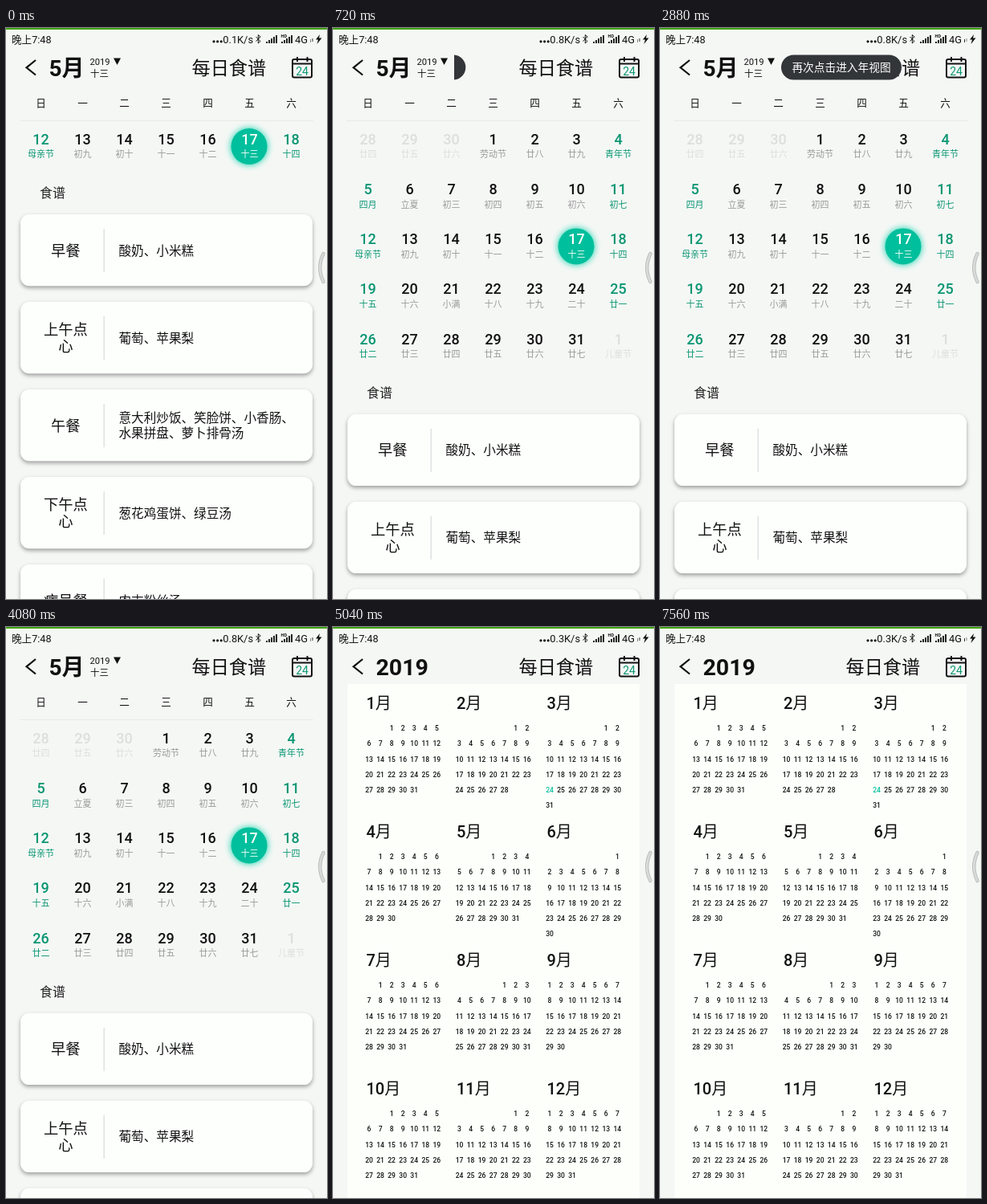
Animation, 400 px wide and 711 px high, one loop 8 s. Source, as an HTML page with a canvas:

```html
<!DOCTYPE html>
<html lang="zh">
<head>
<meta charset="utf-8">
<title>每日食谱</title>
<style>
  html, body { margin: 0; width: 100%; height: 100%; overflow: hidden; background: #f5f7f5; }
  canvas { display: block; width: 400px; height: 711px; }
</style>
</head>
<body>
<canvas id="stage" width="400" height="711"></canvas>
<script>
const ctx = document.getElementById('stage').getContext('2d');
const LOOP = 8000, TICK = 120;
const BG = '#f5f7f5', INK = '#111', GREEN = '#0a9672', TEAL = '#00bf9c';
const FONT = 'Roboto, "Noto Sans CJK SC", "Noto Sans CJK", "Noto Sans SC", sans-serif';
const ROW = 62.2, GRID_TOP = 116, GRID_MID = 271.7;

const WEEK = [...'日一二三四五六'];
const LABELS = ('廿四 廿五 廿六 劳动节 廿八 廿九 青年节 四月 立夏 初三 初四 初五 初六 初七 ' +
  '母亲节 初九 初十 十一 十二 十三 十四 十五 十六 小满 十八 十九 二十 廿一 ' +
  '廿二 廿三 廿四 廿五 廿六 廿七 儿童节').split(' ');
const MEALS = [
  [['早餐'], ['酸奶、小米糕']],
  [['上午点', '心'], ['葡萄、苹果梨']],
  [['午餐'], ['意大利炒饭、笑脸饼、小香肠、', '水果拼盘、萝卜排骨汤']],
  [['下午点', '心'], ['葱花鸡蛋饼、绿豆汤']],
  [['病号餐'], ['肉末粉丝汤']],
];

const progress = (t, start, length) => Math.min(1, Math.max(0, (t - start) / length));
const ease = p => (1 - Math.cos(Math.PI * p)) / 2;
const columnX = i => 43.5 + 52 * i;

// Text is placed by its vertical middle.
function text(str, x, middle, size, { color = INK, weight = 400, align = 'left' } = {}) {
  ctx.font = `${weight} ${size}px ${FONT}`;
  ctx.fillStyle = color;
  ctx.textAlign = align;
  ctx.fillText(str, x, middle + size * 0.365);
}

function rect(x, y, w, h, color) {
  ctx.fillStyle = color;
  ctx.fillRect(x, y, w, h);
}

function line(points, width, color = INK) {
  ctx.beginPath();
  points.forEach(([x, y]) => ctx.lineTo(x, y));
  ctx.lineWidth = width;
  ctx.strokeStyle = color;
  ctx.stroke();
}

function polygon(points, color = INK) {
  ctx.beginPath();
  points.forEach(([x, y]) => ctx.lineTo(x, y));
  ctx.fillStyle = color;
  ctx.fill();
}

function rounded(x, y, w, h, r) {
  ctx.beginPath();
  ctx.roundRect(x, y, w, h, r);
}

function clipped(x, y, w, h, draw) {
  ctx.save();
  ctx.beginPath();
  ctx.rect(x, y, w, h);
  ctx.clip();
  draw();
  ctx.restore();
}

function shadow(color, blur, dy = 0) {
  ctx.shadowColor = color;
  ctx.shadowBlur = blur;
  ctx.shadowOffsetY = dy;
}

function signal(x) {
  for (let i = 0; i < 5; i++) rect(x + i * 3, 17 - i * 2, 2, 2 + i * 2, '#222');
}

function statusBar(t) {
  rect(0, 0, 400, 2, '#3fa30f');
  text('晚上7:48', 7, 14, 12.6);
  const speed = t < 120 ? '0.1' : t < 4680 ? '0.8' : '0.3';
  text(speed + 'K/s', 308, 14, 12.8, { align: 'right' });
  for (let i = 0; i < 3; i++) {
    ctx.beginPath();
    ctx.arc(259 + i * 4.6, 16.8, 1.6, 0, 7);
    ctx.fillStyle = INK;
    ctx.fill();
  }
  line([[311.5, 11], [317, 16.5], [314.3, 19], [314.3, 8.5], [317, 11], [311.5, 16.5]], 1);
  signal(324);
  signal(343);
  rect(342, 7, 9, 6, BG);
  text('HD', 342.5, 9.7, 5.5, { weight: 700 });
  text('4G', 360, 14, 12.8);
  const busy = t >= 2880 && t < 3960 || t >= 7560;
  line([[379.5, 14], [379.5, 18]], 1, busy ? '#333' : '#888');
  line([[382, 13], [382, 17]], 1, busy ? '#888' : '#333');
  polygon([[391, 8], [386, 14.5], [389, 14.5], [387.5, 20], [393.5, 12.5], [390, 12.5]]);
}

function header(isYear) {
  line([[37, 40], [25.5, 49.3], [37, 58.5]], 2.2);
  if (isYear) {
    text('2019', 53.5, 50, 28.5, { weight: 700 });
  } else {
    text('5月', 53.5, 50, 28, { weight: 700 });
    text('2019', 104.5, 42, 11.2);
    text('十三', 105, 57.3, 11.4);
    polygon([[134, 37.5], [143, 37.5], [138.5, 46]]);
  }
  text('每日食谱', 231.5, 49.7, 23.2);
  rounded(357, 39, 24, 22.5, 2);
  ctx.lineWidth = 2;
  ctx.strokeStyle = INK;
  ctx.stroke();
  line([[357, 44.5], [381, 44.5]], 2);
  for (const x of [363, 375.5]) line([[x, 36], [x, 42]], 2);
  text('24', 369, 53.5, 14, { color: GREEN, align: 'center' });
}

function weekBar(shift) {
  rect(0, 71, 400, 45, BG);
  clipped(0, 71, 400, 44, () =>
    WEEK.forEach((d, i) => text(d, columnX(i), 93.5 - shift, 12.6, { align: 'center' })));
  rect(17, 115, 366, 1, '#e8ebe9');
}

function monthGrid(shift, scale) {
  ctx.save();
  ctx.translate(199.5, GRID_MID + shift);
  ctx.scale(scale, scale);
  ctx.translate(-199.5, -GRID_MID);
  LABELS.forEach((label, i) => {
    const column = i % 7, x = columnX(column), y = GRID_TOP + ROW * Math.floor(i / 7);
    const selected = i === 19, outside = i < 3 || i > 33;
    const weekend = column % 6 === 0;
    if (selected) {
      ctx.save();
      shadow('#00d0a8', 9 * scale);
      ctx.beginPath();
      ctx.arc(x - 0.5, y + 31.5, 22.5, 0, 7);
      ctx.fillStyle = TEAL;
      ctx.fill();
      ctx.restore();
    }
    const pick = normal => selected ? '#fff' : outside ? '#dcdfdd' : weekend ? GREEN : normal;
    const day = i < 3 ? 28 + i : (i - 3) % 31 + 1;
    text(day, x, y + 22.3, 18, { color: pick(INK), weight: 500, align: 'center' });
    text(label, x, y + 41.3, 11, { color: pick('#999'), align: 'center' });
  });
  ctx.restore();
}

function mealList(shift) {
  ctx.save();
  ctx.translate(0, shift);
  rect(0, 178.5, 400, 711, BG);
  text('食谱', 42, 205, 16, { color: '#222' });
  MEALS.forEach(([name, dishes], i) => {
    const top = 232 + 109 * i, middle = top + 45;
    ctx.save();
    shadow('rgba(0,0,0,.36)', 5, 2.5);
    rounded(18, top, 364, 89.3, 11);
    ctx.fillStyle = '#fdfffd';
    ctx.fill();
    ctx.restore();
    rect(121.5, top + 18, 1.3, 54, '#dadddb');
    const column = (lines, x, size, pitch, align) => lines.forEach((str, n) =>
      text(str, x, middle + (n - (lines.length - 1) / 2) * pitch, size, { align }));
    column(name, 74.3, 18.3, 20.8, 'center');
    column(dishes, 140.5, 15.6, 19.6, 'left');
  });
  ctx.restore();
}

function yearView() {
  rect(18, 71, 364, 640, '#fcfffa');
  for (let m = 0; m < 12; m++) {
    const x = 42 + 112.5 * (m % 3), y = 95 + 160 * Math.floor(m / 3);
    text(`${m + 1}月`, x - 0.5, y, 20, { weight: 500 });
    const first = new Date(2019, m, 1).getDay();
    const days = new Date(2019, m + 1, 0).getDate();
    for (let d = 1; d <= days; d++) {
      const cell = first + d - 1, today = m === 2 && d === 24;
      text(d, x + 3 + 14.05 * (cell % 7), y + 31 + 19.2 * Math.floor(cell / 7), 8.5,
        { weight: 500, align: 'center', color: today ? TEAL : INK });
    }
  }
}

function toast(shown) {
  if (!shown) return;
  clipped(151, 30, 151, 40, () => {
    ctx.translate(-150 * (1 - shown), 0);
    rounded(151, 33.5, 150, 31, 15.5);
    ctx.fillStyle = '#333638';
    ctx.fill();
    text('再次点击进入年视图', 226, 49.3, 13.7, { color: '#fff', align: 'center' });
  });
}

function touch(x, y) {
  ctx.beginPath();
  ctx.arc(x, y, 12.5, 0, 7);
  ctx.fillStyle = 'rgba(235,235,250,.15)';
  ctx.fill();
  ctx.lineWidth = 1.2;
  ctx.strokeStyle = 'rgba(205,205,228,.5)';
  ctx.stroke();
}

function edgeHandle() {
  for (const [width, color] of [[4.5, '#bcbebd'], [2.5, '#d9dbda']]) {
    ctx.beginPath();
    ctx.moveTo(395.5, 281);
    ctx.quadraticCurveTo(387, 298.5, 395.5, 316);
    ctx.lineCap = 'round';
    ctx.lineWidth = width;
    ctx.strokeStyle = color;
    ctx.stroke();
    ctx.lineCap = 'butt';
  }
}

function render(t) {
  const open = ease(progress(t, 430, 240));
  const zoom = progress(t, 4701, 260);
  const leave = ease(progress(t, 4701, 220));
  rect(0, 0, 400, 711, BG);
  if (zoom < 1) {
    monthGrid(-2 * ROW * (1 - open), 1 - zoom);
    mealList(4 * ROW * open + 350 * leave);
    rect(0, 0, 400, 71, BG);
    weekBar(42 * zoom);
  } else {
    yearView();
  }
  statusBar(t);
  header(t >= 4680);
  if (t >= 360 && t < 600) touch(113, 43);
  if (t >= 4680 && t < 4920) touch(72, 50);
  toast(ease(progress(t, 660, 300)) * (1 - ease(progress(t, 3900, 180))));
  edgeHandle();
}

function frame() {
  const t = performance.now() % LOOP;
  render(Math.floor(t / TICK) * TICK);
  requestAnimationFrame(frame);
}
frame();
</script>
</body>
</html>
```
